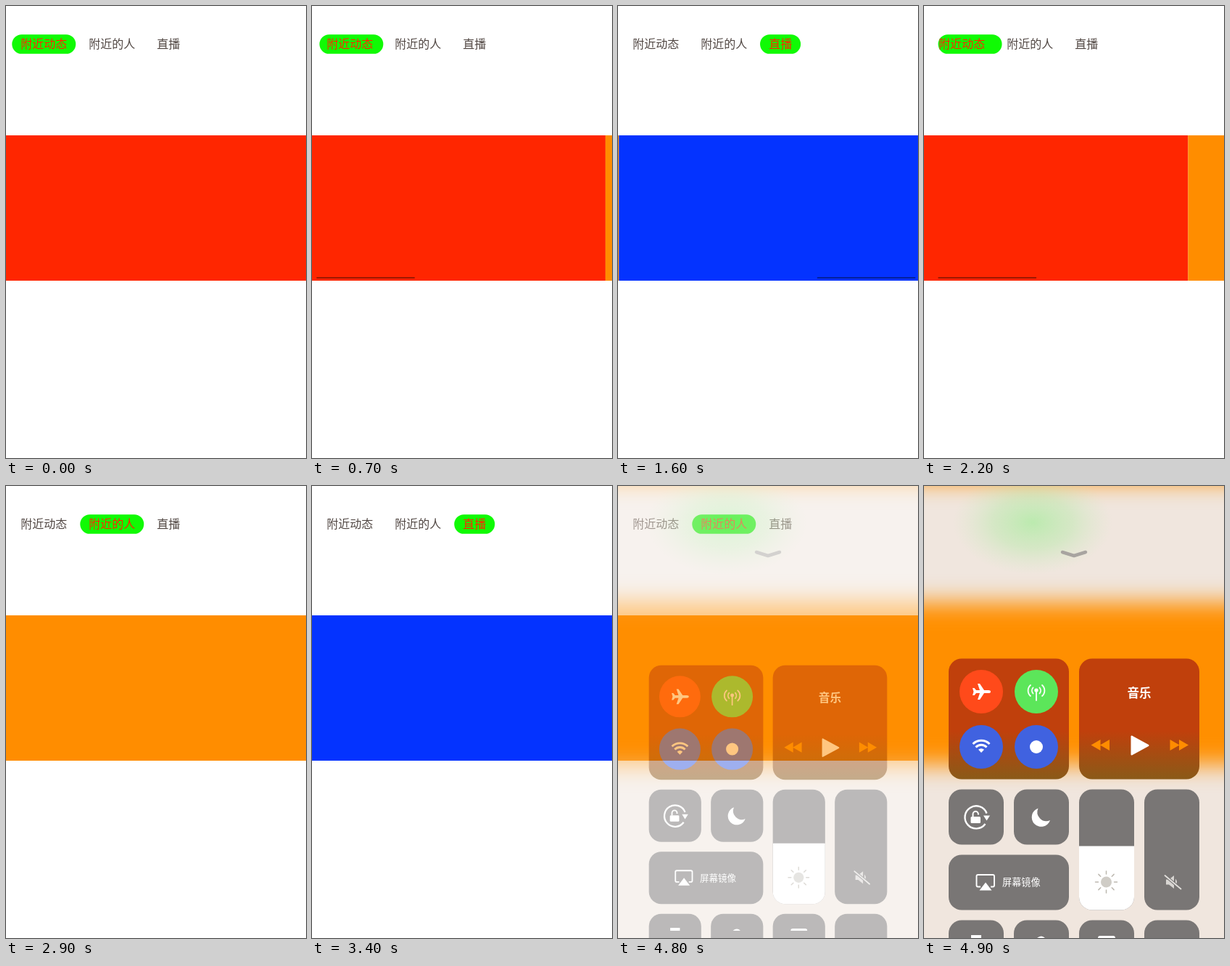
An HTML page for the animation above (5 s loop, 414 by 622 pixels).

```html
<!DOCTYPE html>
<html lang="zh-CN">
<head>
<meta charset="utf-8">
<title>Tabs</title>
<style>
html, body { margin: 0; width: 100%; height: 100%; overflow: hidden; background: #fff; }
svg { display: block; width: 414px; height: 622px; }
text { font-family: "Noto Sans CJK SC", "Noto Sans CJK", "Noto Sans", sans-serif; }
</style>
</head>
<body>
<svg viewBox="0 0 414 622">
  <defs>
    <clipPath id="mask"><rect class="pill" y="39.2" height="26.6" rx="13.3"/></clipPath>
    <filter id="soft" filterUnits="userSpaceOnUse" x="-100" y="-100" width="614" height="822" color-interpolation-filters="sRGB">
      <feGaussianBlur stdDeviation="0 16"/>
    </filter>
    <radialGradient id="glow">
      <stop offset="0" stop-color="#90ee88" stop-opacity=".55"/>
      <stop offset=".5" stop-color="#a4ea98" stop-opacity=".35"/>
      <stop offset="1" stop-color="#c0eab4" stop-opacity="0"/>
    </radialGradient>
    <linearGradient id="rust" x2="0" y2="1">
      <stop offset=".6" stop-color="#c0400c"/>
      <stop offset="1" stop-color="#8a5a18"/>
    </linearGradient>
    <clipPath id="slider"><rect x="214" y="417.5" width="76" height="166" rx="18"/></clipPath>
  </defs>

  <g id="pages"></g>
  <rect id="thumb" y="373" width="136" height="2" rx="1" fill="#000"/>
  <g id="titles" fill="#504642" font-size="16"></g>
  <rect class="pill" y="39.2" height="26.6" rx="13.3" fill="#10fa04"/>
  <g id="lit" fill="#ff2600" font-size="16" clip-path="url(#mask)"></g>

  <g id="center">
    <rect width="414" height="622" fill="#f0e6de"/>
    <g fill="#ff8f00" filter="url(#soft)">
      <rect y="-90" width="414" height="84"/>
      <rect y="160" width="414" height="224"/>
    </g>
    <ellipse cx="150" cy="50" rx="110" ry="72" fill="url(#glow)"/>
    <path d="M191 91L207 96L223 91" fill="none" stroke="#a8a4a0" stroke-width="4.5" stroke-linecap="round" stroke-linejoin="round"/>
    <g id="modules">
      <g id="tiles"></g>
      <!-- airplane -->
      <path d="M92 283q0 2-3 2h-6l-6 9h-3l3-9h-5l-2.500 3h-2.500l1.500-5l-1.500-5h2.500l2.500 3h5l-3-9h3l6 9h6q3 0 3 2z" fill="#fff"/>
      <!-- antenna -->
      <path d="M155 282V295M150.500 285.500a6 6 0 0 1 0-8M159.500 285.500a6 6 0 0 0 0-8M147 289a10 10 0 0 1 0-15M163 289a10 10 0 0 0 0-15" fill="none" stroke="#fff" stroke-width="1.800" stroke-linecap="round"/>
      <circle cx="155" cy="281" r="2.600" fill="#fff"/>
      <!-- wireless arcs -->
      <path d="M67.500 355a16.500 16.500 0 0 1 23 0M71.500 359.500a10.500 10.500 0 0 1 15 0" fill="none" stroke="#fff" stroke-width="3"/>
      <path d="M79 367l-4-4.200a5.700 5.700 0 0 1 8 0z" fill="#fff"/>
      <circle cx="155" cy="359" r="9" fill="#fff"/>
      <!-- player -->
      <text x="297" y="290.500" font-size="16.500" font-weight="700" text-anchor="middle" fill="#fff">音乐</text>
      <path d="M243.500 349v15l-13-7.500zM256 349v15l-13-7.500zM339.500 349v15l13-7.500zM352 349v15l13-7.500z" fill="#ff8c00"/>
      <path d="M286.500 344.500v25l23-12.500z" fill="#fff" stroke="#fff" stroke-width="2" stroke-linejoin="round"/>
      <!-- rotation lock -->
      <path d="M86.500 450.500A15.500 15.500 0 1 0 84.500 465" fill="none" stroke="#fff" stroke-width="2.400"/>
      <path d="M82 453.500h9l-4.500 7z" fill="#fff"/>
      <rect x="64.500" y="455" width="13.500" height="9" rx="1.500" fill="#fff"/>
      <path d="M67.500 455v-3.500a3.700 3.700 0 0 1 7.400 0v1" fill="none" stroke="#fff" stroke-width="2"/>
      <!-- moon -->
      <path d="M157.500 443.500a13 13 0 1 0 16.500 16.500a12.500 12.500 0 0 1-16.500-16.500z" fill="#fff"/>
      <!-- brightness -->
      <rect x="214" y="495.500" width="76" height="89" fill="#fff" clip-path="url(#slider)"/>
      <circle cx="251.500" cy="545" r="7.500" fill="#cfccc6"/>
      <g id="rays" stroke="#bdb8b0" stroke-width="1.500" stroke-linecap="round"></g>
      <!-- muted speaker -->
      <path d="M334 541.500h4l7-5.500v18l-7-5.500h-4zM347 540.500q4 4.500 0 9z" fill="#d8d5d2"/>
      <path d="M332.500 536L354.500 554.500" stroke="#777574" stroke-width="4"/>
      <path d="M332.500 536L354.500 554.500" stroke="#e2dfdc" stroke-width="1.800" stroke-linecap="round"/>
      <!-- screen mirroring -->
      <path d="M78 551.500h-3.500q-2 0-2-2V537q0-2 2-2h20.500q2 0 2 2v12.500q0 2-2 2H92" fill="none" stroke="#fff" stroke-width="1.900"/>
      <path d="M76.500 556.500l8.500-11l8.500 11z" fill="#fff"/>
      <text x="108" y="550" font-size="13.200" fill="#fff">屏幕镜像</text>
      <!-- tops of the next row -->
      <path d="M65 618h14v4h-14zM156 622q6-5 11 0zM240 622q0-3 3-3h18q3 0 3 3z" fill="#fff"/>
    </g>
  </g>
</svg>
<script>
const LOOP = 5000, STEP = 100, W = 414;
const $ = id => document.getElementById(id);

function add(parent, tag, attrs, text) {
  const el = document.createElementNS("http://www.w3.org/2000/svg", tag);
  for (const k in attrs) el.setAttribute(k, attrs[k]);
  if (text) el.textContent = text;
  parent.appendChild(el);
  return el;
}

const clamp = k => Math.min(1, Math.max(0, k));
const mix = (a, b, k) => a + (b - a) * k;
const ramp = (t, from, to) => clamp((t - from) / (to - from));

// Pager and tab bar
const tabs = [
  { label: "附近动态", w: 64, color: "#ff2600" },
  { label: "附近的人", w: 64, color: "#ff8d00" },
  { label: "直播", w: 32, color: "#0433ff" }
];
tabs.forEach((tab, i) => {
  tab.x = 20.3 + 94 * i;
  add($("pages"), "rect", { x: i * W, y: 178, width: W, height: 200, fill: tab.color });
  for (const id of ["titles", "lit"]) add($(id), "text", { x: tab.x, y: 58 }, tab.label);
});

// Control panel on a 90px grid
function tile(col, row, cols, rows, fill = "#797675") {
  add($("tiles"), "rect", {
    x: 34 + 90 * col, y: 237.5 + 90 * row,
    width: 90 * cols - 14, height: 90 * rows - 14, rx: 18, fill
  });
}
tile(0, 0, 2, 2, "url(#rust)");
tile(2, 0, 2, 2, "url(#rust)");
tile(0, 2, 1, 1);
tile(1, 2, 1, 1);
tile(2, 2, 1, 2);
tile(3, 2, 1, 2);
tile(0, 3, 2, 1);
for (let col = 0; col < 4; col++) tile(col, 4, 1, 1);

["#ff4a1a", "#5ce65a", "#4062e0", "#4062e0"].forEach((fill, i) =>
  add($("tiles"), "circle", { cx: 79 + 76 * (i % 2), cy: 283 + 76 * (i >> 1), r: 30, fill }));

for (let a = 0; a < 360; a += 45)
  add($("rays"), "path", { d: "M251.5 534V530", transform: `rotate(${a} 251.5 545)` });

// Taps glide evenly; swipes start with the finger and settle slowly
const glide = k => k * k * (3 - 2 * k);
const flick = k => {
  const u = k ** 0.7;
  return u ** 3 * (10 - 15 * u + 6 * u * u);
};
const tap = (start, to) => ({ start, to, end: start + 280, ease: glide });
const swipe = (start, end, to) => ({ start, end, to, ease: flick });

const moves = [
  tap(20, 1),
  swipe(450, 760, 0),
  swipe(760, 1085, 1),
  swipe(1085, 1655, 2),
  swipe(1655, 1910, 1),
  swipe(1910, 2360, 0),
  swipe(2360, 2720, 1),
  tap(3090, 2),
  tap(3620, 1)
];
const swipes = moves.filter(m => m.ease === flick);
const firstTouch = swipes[0].start, lastRest = swipes[swipes.length - 1].end;

const pageAt = t => moves.reduce((page, m) => mix(page, m.to, m.ease(ramp(t, m.start, m.end))), 0);

const pills = document.querySelectorAll(".pill");

function draw(t) {
  const page = pageAt(t);
  const i = Math.min(1, Math.floor(page)), k = page - i;
  const a = tabs[i], b = tabs[i + 1];
  for (const p of pills) {
    p.setAttribute("x", mix(a.x, b.x, k) - 12);
    p.setAttribute("width", mix(a.w, b.w, k) + 24);
  }
  $("pages").setAttribute("transform", `translate(${-page * W})`);
  $("thumb").setAttribute("x", 3 + page * 136);
  $("thumb").setAttribute("opacity", t < firstTouch ? 0 : 0.38 * (1 - ramp(t, lastRest - 80, lastRest + 80)));

  const open = ramp(t, 4700, 4900), s = mix(0.9, 1, open);
  $("center").setAttribute("opacity", open);
  $("modules").setAttribute("transform", `translate(${207 * (1 - s)} ${420 * (1 - s)}) scale(${s})`);
}

const start = performance.now();
function tick() {
  const t = (performance.now() - start) % LOOP;
  draw(Math.floor(t / STEP) * STEP);
  requestAnimationFrame(tick);
}
tick();
</script>
</body>
</html>
```
